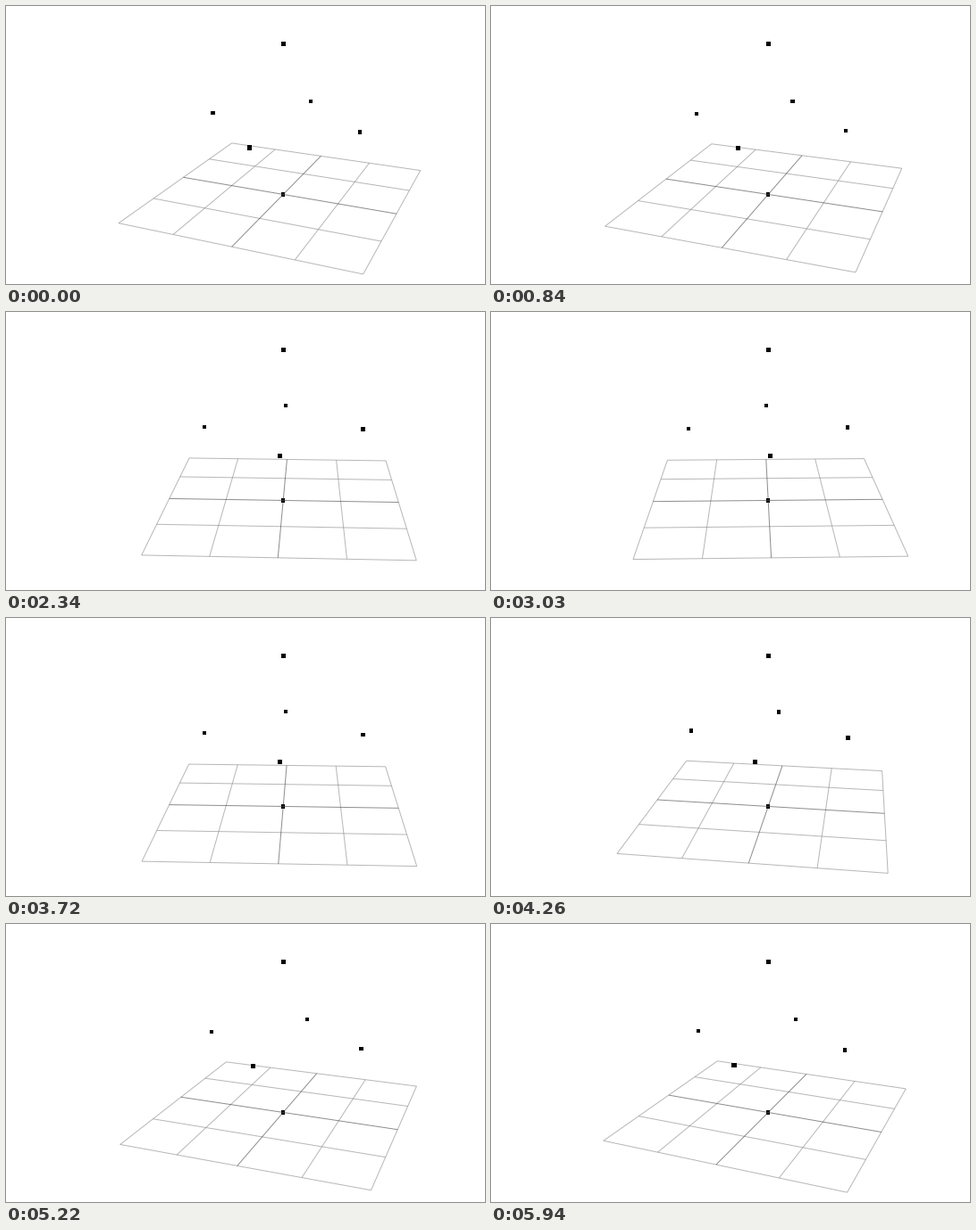
These frames come from a looping animation (536 by 312 pixels, 5970 ms). A matplotlib script:

```python
import matplotlib.pyplot as plt
import numpy as np
from matplotlib.animation import FuncAnimation
from matplotlib.collections import LineCollection, PolyCollection

W, H, DPI = 536, 312, 100
STEP, FRAMES = 30, 199

# Camera orbiting the centre of the octahedron
CX, CY = 310.2, 130.2
FOCAL, DIST = 732.7, 16.5
PITCH = np.radians(18.25)
HALF, R = 3, 2
POINT_SIZE = 4.5


def yaw_at(t):
    """Rotation in radians, swinging back and forth."""
    return np.radians(-10.7 + 11.96 * np.cos(1.115 * (t - 3.04)))


def project(pts, yaw):
    x, y, z = np.moveaxis(np.asarray(pts, float), -1, 0)
    c, s = np.cos(yaw), np.sin(yaw)
    x, z, y = x * c - z * s, x * s + z * c, y - R
    depth = DIST + z * np.cos(PITCH) - y * np.sin(PITCH)
    up = y * np.cos(PITCH) + z * np.sin(PITCH)
    k = FOCAL / depth
    return np.stack([CX + k * x, CY - k * up], -1), DIST / depth


def squares(pts, yaw):
    pos, scale = project(pts, yaw)
    corners = np.array([(-1, -1), (1, -1), (1, 1), (-1, 1)]) / 2
    return pos[:, None] + corners * (POINT_SIZE * scale)[:, None, None]


def grid_lines(offsets):
    return [line for o in offsets for line in (
        [(-HALF, 0, o), (HALF, 0, o)],
        [(o, 0, -HALF), (o, 0, HALF)])]


thin = grid_lines([-HALF, -HALF / 2, HALF / 2, HALF])
axes = grid_lines([0])
origin = [(0, 0, 0)]
vertices = [(0, 2 * R, 0), (R, R, 0), (-R, R, 0), (0, R, R), (0, R, -R)]

fig = plt.figure(figsize=(W / DPI, H / DPI), dpi=DPI, facecolor="white")
ax = fig.add_axes([0, 0, 1, 1])
ax.set(xlim=(0, W), ylim=(H, 0))
ax.axis("off")


def add_lines(color):
    return ax.add_collection(LineCollection(
        [], colors=color, alpha=0.6, linewidths=72 / DPI, zorder=2))


def add_points(zorder):
    return ax.add_collection(PolyCollection(
        [], facecolors="black", edgecolors="none", zorder=zorder))


base = add_points(1)
thin_art = add_lines("#888888")
axes_art = add_lines("#444444")
top = add_points(3)


def update(i):
    yaw = yaw_at(i * STEP / 1000)
    thin_art.set_segments(project(thin, yaw)[0])
    axes_art.set_segments(project(axes, yaw)[0])
    base.set_verts(squares(origin, yaw))
    top.set_verts(squares(vertices, yaw))
    return base, thin_art, axes_art, top


anim = FuncAnimation(fig, update, frames=FRAMES, interval=STEP,
                     repeat=True, repeat_delay=0, blit=False)
plt.show()
```
